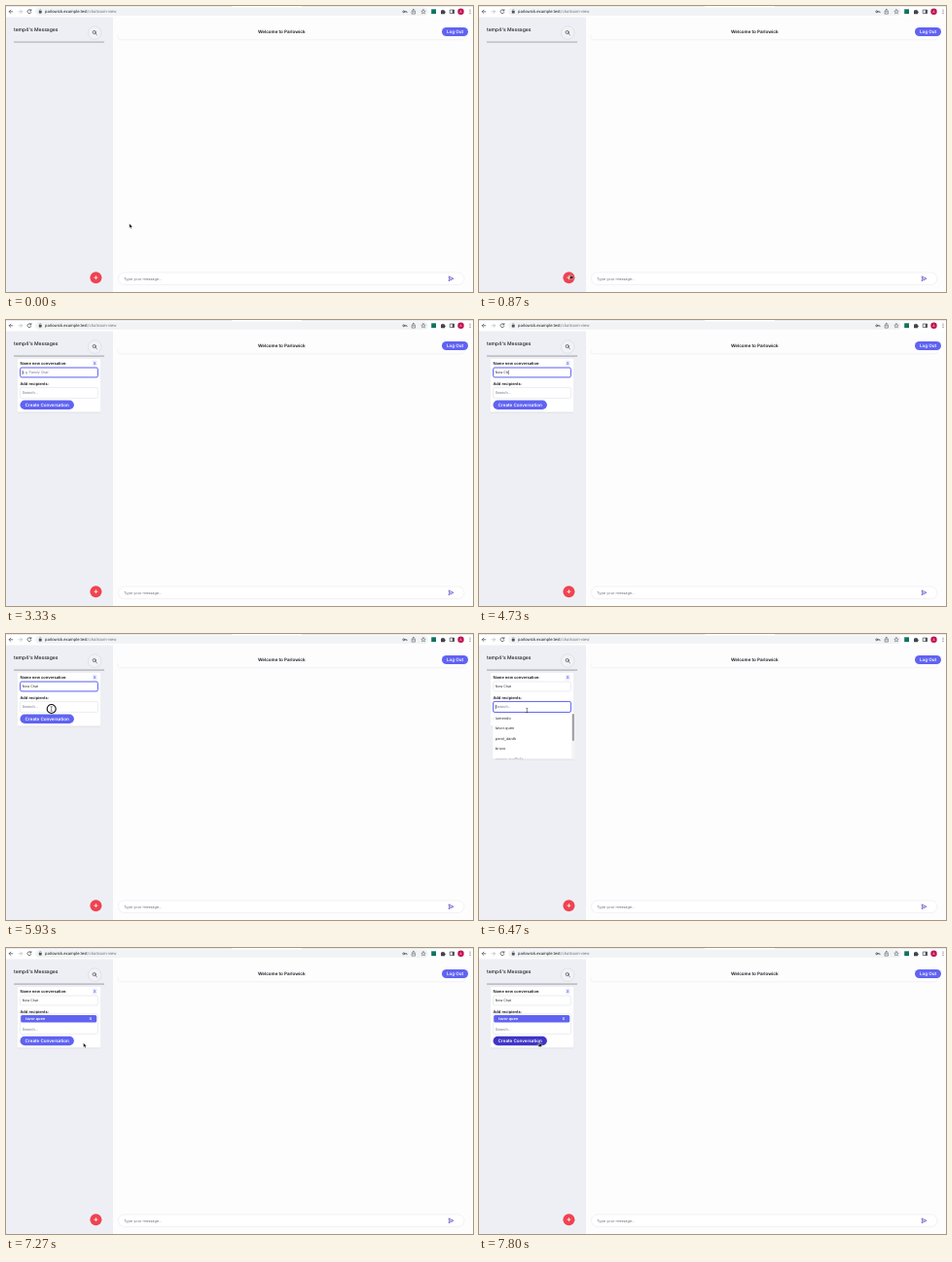
Animation of 480 by 294 pixels, one loop 8 s. Source, as an HTML page:

```html
<!DOCTYPE html>
<html lang="en">
<head>
<meta charset="utf-8">
<title>Messages</title>
<style>
  html, body { margin: 0; width: 100%; height: 100%; overflow: hidden; background: #fdfdfe; }
  svg { display: block; width: 100vw; height: 100vh; }
  text { font: 400 3.9px Inter, sans-serif; fill: #2b2b33; text-rendering: geometricPrecision; }
  .bold { font-weight: 600; }
  .hint { fill: #6f7480; }
  .light { fill: #fff; }
  .label { font-size: 4.03px; font-weight: 600; fill: #16161c; }
  .button { font-size: 4.55px; font-weight: 600; fill: #fff; }
  .indigo { fill: #6063f1; }
  .field { fill: #fff; stroke: #d9dbe2; stroke-width: .5; }
  .line { fill: none; stroke: #4d5056; stroke-width: .75; stroke-linecap: round; stroke-linejoin: round; }
</style>
</head>
<body>
<svg viewBox="0 0 480 294" preserveAspectRatio="none">
  <defs>
    <filter id="shadow" x="-10%" y="-10%" width="120%" height="125%">
      <feDropShadow dx="0" dy=".5" stdDeviation=".7" flood-opacity=".16"/>
    </filter>
    <clipPath id="listClip"><rect x="14" y="81" width="84.5" height="47.3"/></clipPath>
  </defs>

  <!-- browser bar -->
  <g>
    <rect width="480" height="11.5" fill="#fff"/>
    <rect y="0" width="232" height=".7" fill="#dee1e6"/>
    <rect x="304" y="0" width="176" height=".7" fill="#dee1e6"/>
    <rect x="30" y="1.6" width="404" height="8.4" rx="4.2" fill="#f1f3f4"/>
    <path class="line" d="M6.8 5.8H3.2M4.9 4.1 3.2 5.8l1.7 1.7"/>
    <path class="line" d="M13 5.8h3.6M14.9 4.1l1.7 1.7-1.7 1.7" style="stroke:#b9bcc1"/>
    <path class="line" d="M25.7 4.6a2 2 0 1 0 .2 1.9M25.9 3.5v1.4h-1.4"/>
    <rect x="33.8" y="5.1" width="2.8" height="2.5" rx=".3" fill="#4d5056"/>
    <path class="line" d="M34.4 5.1V4.4a.8.8 0 0 1 1.6 0v.7" style="stroke-width:.5"/>
    <text x="40" y="7.3" style="font:4.25px Roboto,sans-serif;fill:#202124">parlowick.example.test<tspan fill="#747980">/chatroom-view</tspan></text>
    <g class="line">
      <circle cx="408.8" cy="5.8" r="1"/><path d="M409.8 5.8h2.2v.9"/>
      <path d="M417.8 5.2h-.7v2.9h3.4V5.2h-.7M418.8 6.5V3.3M417.8 4.2l1-1 1 1" style="stroke-width:.55"/>
      <path d="M429 3.6l.65 1.5 1.55.15-1.2 1 .4 1.6-1.4-.9-1.4.9.4-1.6-1.2-1 1.55-.15z" style="stroke-width:.5"/>
      <rect x="456.6" y="4" width="4" height="3.6"/>
    </g>
    <rect x="437.2" y="3.3" width="4.8" height="4.8" fill="#0d7560"/>
    <path d="M447 4.5h1.2a.8.8 0 0 1 1.6 0H451v1.1a.8.8 0 0 1 0 1.6v1.1h-4z" fill="#43464c"/>
    <rect x="458.8" y="4" width="1.8" height="3.6" fill="#43464c"/>
    <circle cx="467.5" cy="5.8" r="3.2" fill="#c2114e"/>
    <text class="light" x="467.5" y="7.1" text-anchor="middle" style="font-size:3.4px">A</text>
    <g fill="#4d5056"><circle cx="477" cy="4" r=".5"/><circle cx="477" cy="5.8" r=".5"/><circle cx="477" cy="7.6" r=".5"/></g>
  </g>

  <!-- sidebar -->
  <rect y="11.5" width="110" height="283" fill="#eeeff4"/>
  <text x="8" y="26.4" style="font-size:5px;font-weight:500;fill:#1c1c24">temp4's Messages</text>
  <circle cx="91.2" cy="27.6" r="6.8" fill="#f1f2f6" stroke="#cfd1d8" stroke-width=".5"/>
  <g class="line"><circle cx="90.7" cy="27" r="1.6"/><path d="M91.9 28.2l1.5 1.5"/></g>
  <rect id="divider" x="8" width="93"/>
  <circle cx="92.4" cy="279.2" r="6" fill="#ef4350"/>
  <path d="M90.4 279.2h4M92.4 277.2v4" stroke="#fff" stroke-width=".8"/>

  <!-- main pane -->
  <path d="M115 30v2.5q0 2.2 2.2 2.2h351.6q2.2 0 2.2-2.2V30" fill="none" stroke="#ececf0" stroke-width=".6"/>
  <text class="bold" x="283.2" y="28.2" text-anchor="middle" style="font-size:4.55px;fill:#17171d">Welcome to Parlowick</text>
  <rect class="indigo" x="448" y="21.9" width="27" height="9.2" rx="4.6"/>
  <text class="button" x="461.5" y="28.1" text-anchor="middle">Log Out</text>
  <rect x="115.5" y="274" width="355.5" height="12.6" rx="6.3" fill="#fff" stroke="#e9e9ee" stroke-width=".6"/>
  <text class="hint" x="121" y="281.8">Type your message...</text>
  <path d="M455 277.9l5 2.4-5 2.4.7-2.4zM455.7 280.3h2" fill="none" stroke="#5a52c8" stroke-width=".75" stroke-linejoin="round"/>

  <!-- new conversation form -->
  <g id="form">
    <rect id="card" x="12" y="40" width="85" fill="#fff" filter="url(#shadow)"/>
    <text class="label" x="14.5" y="46.1">Name new conversation:</text>
    <rect x="88.8" y="41.4" width="4.8" height="6.2" rx=".8" fill="#eceefe"/>
    <text class="bold indigo" x="91.2" y="46" text-anchor="middle" style="font-size:4px">X</text>
    <rect id="nameField" class="field" x="14.6" y="49" width="79.8" height="9.9" rx="1.5"/>
    <text id="nameText" x="16.8" y="55.2" style="font-size:3.5px"></text>
    <text class="label" x="14.5" y="66.6">Add recipients:</text>
    <rect id="searchField" class="field" x="14.6" width="79.8" rx="1.5"/>
    <g id="chip">
      <rect class="indigo" x="15.2" y="69" width="78" height="7.4" rx="1.5"/>
      <text class="bold light" x="20" y="74.2">tavor.quen</text>
      <text class="bold light" x="86.8" y="74.2" text-anchor="middle">X</text>
    </g>
    <g id="lower">
      <text class="hint" x="16.8" y="76.3">Search...</text>
      <rect id="create" x="14.5" y="82.5" width="55.4" height="9.4" rx="4.7"/>
      <text class="button" x="42.2" y="88.8" text-anchor="middle">Create Conversation</text>
    </g>
    <rect id="caret" width=".5" height="4.4" fill="#15151a"/>
    <g id="list">
      <rect x="14.2" y="81" width="84" height="47.3" fill="#fff" filter="url(#shadow)"/>
      <g id="options" clip-path="url(#listClip)"></g>
      <rect x="95.3" y="81" width="3" height="47.3" fill="#f4f4f5"/>
      <rect x="95.8" y="82" width="2" height="28" rx="1" fill="#9b9ba0"/>
    </g>
  </g>

  <g id="cursor">
    <circle id="ring" r="4.5" fill="#fff" fill-opacity=".5" stroke="#111" stroke-width="1.1"/>
    <path id="arrow" d="M0 0v4.3l1-.9.7 1.6.8-.35-.7-1.5h1.4z" fill="#000" stroke="#fff" stroke-width=".3"/>
    <path id="hand" d="M-.4-1.6q.4-.5.8 0v1.5l1.6.4q.6.2.5.9L2.1 3H-.6L-2 .9q.2-.6.8-.1l.8.6z" fill="#111" stroke="#fff" stroke-width=".4"/>
    <path id="beam" d="M-.9-2.4Q0-2.4 0-1.9Q0-2.4.9-2.4M0-1.9v3.8M-.9 2.4Q0 2.4 0 1.9Q0 2.4.9 2.4" fill="none" stroke="#222" stroke-width=".55"/>
  </g>
</svg>
<script>
const LOOP = 8000;
const OPEN = 1260, FOCUS_NAME = 2400, FOCUS_SEARCH = 6000, PICKED = 7270;

// time, x, y
const path = [
  [270, 126.8, 223.8], [870, 94.4, 277.6], [1270, 94.4, 277.6], [1800, 45, 59.3],
  [1930, 47, 55.5], [2070, 47, 55.5], [2130, 47, 57], [5400, 47, 57], [5730, 46.7, 77],
  [6430, 46.7, 77], [6670, 80.5, 97.6], [7200, 80.5, 97.6], [7730, 62.2, 98.4]
];
const pointers = [[0, 'arrow'], [800, 'hand'], [1300, 'arrow'], [1870, 'beam'], [3330, ''],
  [5400, 'beam'], [6500, 'arrow'], [7700, 'hand']];
const typing = [[0, ''], [3400, 'N'], [3600, 'Ne'], [3870, 'New'], [4130, 'New '], [4530, 'New C'],
  [4730, 'New Ch'], [4930, 'New Cha'], [5200, 'New Chat']];
const clicks = [[1130, 1260], [2330, 2400], [5870, 6000], [7000, 7130]];
const caretOn = [[2400, 2870], [3330, 5600], [6000, 6530], [7000, 7270]];

const el = id => document.getElementById(id);
const set = (id, attrs) => { for (const k in attrs) el(id).setAttribute(k, attrs[k]); };
const show = (id, on) => { el(id).style.display = on ? '' : 'none'; };
const during = (spans, t) => spans.some(([a, b]) => t >= a && t < b);
const latest = (steps, t) => steps.filter(s => s[0] <= t).pop()[1];

const ROW = 10.45;
const options = ['lumendo', 'tavor.quen', 'perol_danth', 'bruvo', 'umera_quellista'];
el('options').innerHTML = options.map((name, i) => {
  const y = 81.6 + i * ROW;
  return `<g><rect class="indigo" x="14.2" y="${y}" width="81" height="${ROW}"/>` +
    `<text x="16.8" y="${y + 6.4}">${name}</text></g>`;
}).join('');

function pointerAt(t) {
  const i = path.findIndex(p => p[0] > t);
  if (i === 0) return path[0].slice(1);
  if (i < 0) return path[path.length - 1].slice(1);
  const [a, x0, y0] = path[i - 1], [b, x1, y1] = path[i];
  const u = (t - a) / (b - a), e = u * u * (3 - 2 * u);
  return [x0 + (x1 - x0) * e, y0 + (y1 - y0) * e];
}

function drawField(id, focused) {
  el(id).style.stroke = focused ? '#5b5ef0' : '';
  el(id).style.strokeWidth = focused ? 1 : '';
}

function drawForm(t, y) {
  const picked = t >= PICKED, inSearch = t >= FOCUS_SEARCH;
  const name = latest(typing, t);
  const nameText = el('nameText');
  show('form', t >= OPEN);
  set('card', { height: picked ? 62.3 : 54.5 });
  nameText.textContent = name.trimEnd() || "e.g 'Family Chat'";
  nameText.setAttribute('class', name ? '' : 'hint');
  drawField('nameField', t >= FOCUS_NAME && !inSearch);
  drawField('searchField', inSearch && !picked);
  set('searchField', picked ? { y: 67.8, height: 20.6 } : { y: 69.4, height: 11 });
  show('chip', picked);
  set('lower', { transform: `translate(0 ${picked ? 8.3 : 0})` });
  set('create', { fill: t >= 7700 ? '#3f35c6' : '#6063f1' });

  const width = name && !inSearch ? nameText.getComputedTextLength() : 0;
  const space = name.endsWith(' ') ? 1 : 0;
  show('caret', during(caretOn, t));
  set('caret', { x: 16.8 + width + space, y: inSearch ? 72.8 : 51.7 });

  show('list', inSearch && !picked);
  const hovered = Math.floor((y - 81.6) / ROW);
  [...el('options').children].forEach((row, i) => {
    row.children[0].style.display = i === hovered ? '' : 'none';
    row.children[1].style.fill = i === hovered ? '#f1f1ff' : '';
  });
}

function render(t) {
  const [x, y] = pointerAt(t);
  const kind = latest(pointers, t);
  set('divider', t >= OPEN
    ? { y: 36.3, height: 1.6, fill: '#bbbcc4' }
    : { y: 36.7, height: .7, fill: '#85878f' });
  drawForm(t, y);
  set('cursor', { transform: `translate(${x} ${y})` });
  for (const id of ['arrow', 'hand', 'beam']) show(id, id === kind);
  show('ring', during(clicks, t));
}

const start = performance.now();
function tick() {
  render((performance.now() - start) % LOOP);
  requestAnimationFrame(tick);
}
tick();
</script>
</body>
</html>
```
